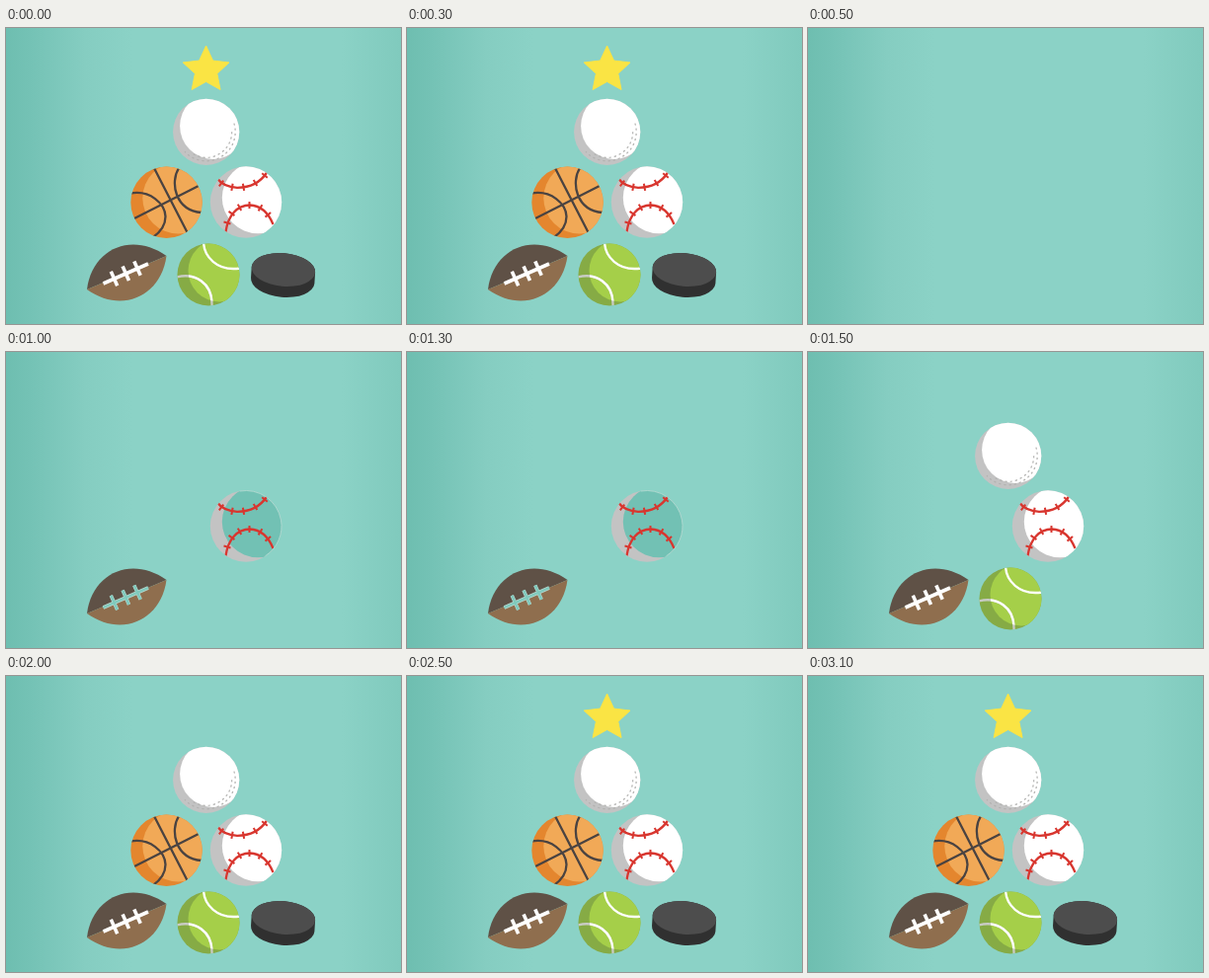
These frames come from a looping animation (400x300 px, 3500 ms). An HTML page with a canvas:

```html
<!DOCTYPE html>
<html lang="en">
<head>
<meta charset="utf-8">
<title>Sports tree</title>
<style>
html, body { margin: 0; width: 100%; height: 100%; overflow: hidden; background: #8bd2c6; }
canvas { display: block; width: 400px; height: 300px; }
</style>
</head>
<body>
<canvas id="stage" width="400" height="300"></canvas>
<script>
const ctx = document.getElementById('stage').getContext('2d');
const STEP = 500;
// How many groups are visible in each step of the loop
const LEVELS = [4, 0, 1, 2, 3, 4, 4];
const TEAL = '#72c1b4';

function fill(d, color) {
  ctx.fillStyle = color;
  ctx.fill(new Path2D(d));
}

function line(d, color, width) {
  ctx.strokeStyle = color;
  ctx.lineWidth = width;
  ctx.stroke(new Path2D(d));
}

function disc(x, y, r, color) {
  ctx.fillStyle = color;
  ctx.beginPath();
  ctx.arc(x, y, r, 0, Math.PI * 2);
  ctx.fill();
}

function clipDisc(x, y, r) {
  ctx.beginPath();
  ctx.arc(x, y, r, 0, Math.PI * 2);
  ctx.clip();
}

// Shaded sphere; details are drawn clipped to its outline
function ball(x, y, r, dx, dy, shade, light, details) {
  ctx.save();
  disc(x, y, r, shade);
  clipDisc(x, y, r);
  disc(x + dx, y + dy, r, light);
  if (details) details();
  ctx.restore();
}

function background() {
  const g = ctx.createLinearGradient(0, 0, 400, 0);
  g.addColorStop(0, '#6ebeb0');
  g.addColorStop(0.06, '#74c2b5');
  g.addColorStop(0.2, '#85cdc1');
  g.addColorStop(0.32, '#8bd2c6');
  g.addColorStop(0.85, '#8bd2c6');
  g.addColorStop(1, '#80cabd');
  ctx.fillStyle = g;
  ctx.fillRect(0, 0, 400, 300);
}

function football(hollow) {
  const top = 'M82 265C87 224 127 206 162.5 231';
  fill(top + 'Z', '#5f5146');
  fill('M82 265C117 290 157 272 162.5 231Z', '#8f6e4e');
  let laces = 'M98.5 259L144 239';
  for (const [x, y] of [[109.5, 254], [121.3, 248.8], [133, 243.6]]) {
    laces += `M${x - 3.2} ${y - 7.2}L${x + 3.2} ${y + 7.2}`;
  }
  line(laces, hollow ? '#b5d8d0' : '#fff', 3.6);
  if (hollow) line(laces, '#80cabd', 2.4);
}

function baseball(hollow) {
  ball(243, 176.5, 36.2, 12, -4.5, '#c3c3c3', hollow ? TEAL : '#fff', () => {
    const red = '#d8362f';
    line('M214 152.5Q220 161 234 161.8Q254 162 264.5 146', red, 2.3);
    line('M222.5 206.5C225 190 234 179.5 247 179.5C258 180 266 188 270.5 199', red, 2.3);
    // x, y and direction of each stitch in degrees
    const stitches = [
      [218, 157.5, 128], [229, 161.3, 100], [240.5, 161.3, 80], [252.5, 157, 60], [262, 149.5, 40],
      [224, 197.5, 15], [228.5, 188, 35], [236.5, 181.8, 62], [246.5, 179.5, 90], [257.5, 182.3, 122], [265.3, 189.3, 140]
    ];
    for (const [x, y, deg] of stitches) {
      const a = deg * Math.PI / 180;
      const u = Math.cos(a) * 3.6, v = Math.sin(a) * 3.6;
      line(`M${x - u} ${y - v}L${x + u} ${y + v}`, red, 2);
    }
  });
  if (hollow) {
    ctx.beginPath();
    ctx.arc(243, 176.5, 36, -1.75, 1);
    ctx.strokeStyle = '#b5ddd5';
    ctx.lineWidth = 0.8;
    ctx.stroke();
  }
}

function tennisBall() {
  const x = 205, y = 250, r = 31.5;
  const seam = 'M173 252.5C190 248 209.5 257 208.5 282';
  ball(x, y, r, 11, -4, '#86ab45', '#a5cf49', () => {
    line(seam, '#c8cbc3', 2.3);
    line('M200 217C200.5 231 213 247 237 243.5', '#fff', 2.3);
    clipDisc(x + 11, y - 4, r);
    line(seam, '#fff', 2.3);
  });
}

function golfBall() {
  const x = 202.7, y = 105.3;
  ball(x, y, 33.6, 7, -6, '#c3c3c3', '#fff', () => {
    ctx.strokeStyle = '#b2b2b0';
    ctx.lineWidth = 1.2;
    ctx.setLineDash([2.2, 3]);
    for (const [r, from, to] of [[29.5, -0.3, 2.4], [26, 0, 2.2]]) {
      ctx.beginPath();
      ctx.arc(x, y, r, from, to);
      ctx.stroke();
    }
  });
}

function basketball() {
  ball(162.5, 176.8, 36.2, 12, -4.5, '#e4862e', '#f1a957', () => {
    line('M129 193.5L195 160M149.5 141L185 210' +
      'M126 167.5C146 164 161 178 161.5 191C161.5 200 156 207 149 212' +
      'M175 142C166 156 171 185 198 187', '#4a4341', 2.3);
  });
}

function puck() {
  const tilt = 0.09;
  ctx.fillStyle = '#303030';
  ctx.beginPath();
  ctx.ellipse(280.9, 245, 32.3, 16.8, tilt, Math.PI, Math.PI * 2);
  ctx.ellipse(280.2, 256, 32.3, 16.8, tilt, 0, Math.PI);
  ctx.fill();
  ctx.fillStyle = '#4d4d4d';
  ctx.beginPath();
  ctx.ellipse(280.9, 245, 32.3, 16.8, tilt, 0, Math.PI * 2);
  ctx.fill();
}

function star() {
  ctx.beginPath();
  for (let i = 0; i < 10; i++) {
    const r = i % 2 ? 11.8 : 24.6;
    const a = i * Math.PI / 5 - Math.PI / 2;
    ctx.lineTo(202.6 + r * Math.cos(a), 42.6 + r * Math.sin(a));
  }
  ctx.closePath();
  ctx.fillStyle = ctx.strokeStyle = '#fae444';
  ctx.lineWidth = 1;
  ctx.lineJoin = 'round';
  ctx.fill();
  ctx.stroke();
}

function draw(time) {
  const level = LEVELS[Math.floor(time / STEP) % LEVELS.length];
  background();
  if (level >= 1) {
    football(level === 1);
    baseball(level === 1);
  }
  if (level >= 2) {
    tennisBall();
    golfBall();
  }
  if (level >= 3) {
    basketball();
    puck();
  }
  if (level >= 4) star();
}

function tick() {
  draw(performance.now());
  requestAnimationFrame(tick);
}
tick();
</script>
</body>
</html>
```
